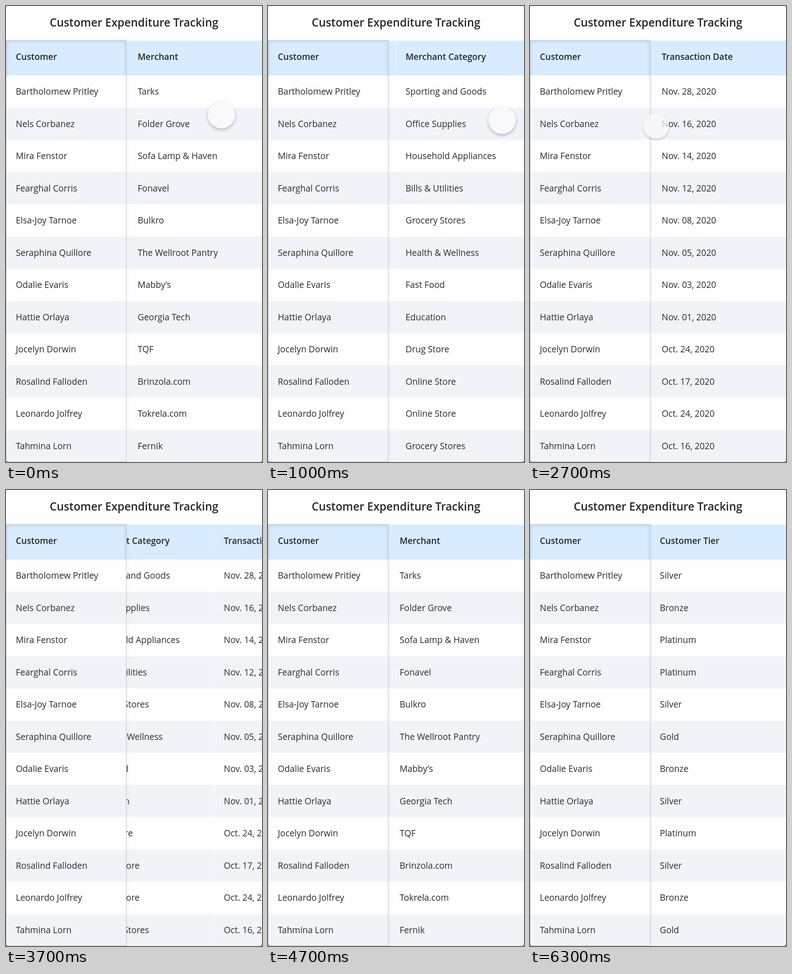
These frames come from a looping animation (561x998 px, 6.6 s). An HTML page:

```html
<!DOCTYPE html>
<html lang="en">
<head>
<meta charset="utf-8">
<title>Customer Expenditure Tracking</title>
<style>
  html, body { margin: 0; width: 100%; height: 100%; overflow: hidden; background: #8c8c90; }
  #stage {
    position: absolute; left: 0; top: 0; width: 561px; height: 998px; overflow: hidden;
    border-radius: 0 0 6px 6px; background: #fefdff; color: #2a2c2f;
    font: 400 19.1px "Open Sans", sans-serif; white-space: nowrap;
  }
  h1 {
    position: absolute; left: 0; top: 16px; width: 561px; margin: 0;
    font-size: 24.4px; font-weight: 600; line-height: 40px; text-align: center; color: #242629;
  }
  .band { position: absolute; left: 0; width: 561px; height: 70.5px; background: #f2f3f8; }
  .band.head { height: 76px; background: #d9ecff; }
  #view { position: absolute; left: 264px; top: 76px; width: 297px; height: 922px; overflow: hidden; }
  #track { position: absolute; left: 0; top: 0; will-change: transform; }
  .col { position: absolute; top: 0; width: 295px; height: 922px; }
  #track .col + .col::before {
    content: ""; position: absolute; left: 0; top: 0; width: 1px; height: 922px;
    background: rgba(255, 255, 255, .4);
  }
  .cell { position: absolute; left: 21.5px; height: 70.5px; line-height: 70.5px; }
  .cell.head { line-height: 70px; font-weight: 600; color: #24272b; }
  #frozen {
    position: absolute; left: 0; top: 75px; width: 264px; height: 923px; box-sizing: border-box;
    border: 1px solid #bcbcc0; border-radius: 0 0 0 6px; box-shadow: 0 0 10px rgba(60, 80, 110, .05);
  }
  #shade { position: absolute; left: 1px; top: 76px; width: 262px; height: 76px; overflow: hidden; }
  #shade::before {
    content: ""; position: absolute; left: 0; top: 0; width: 262px; height: 110px;
    box-shadow: inset 0 1px 9px rgba(90, 125, 165, .24);
  }
  #names { left: 0; top: 76px; }
  #touch {
    position: absolute; left: -30px; top: -30px; width: 60px; height: 60px; border-radius: 50%;
    background: #f9f9fb; box-shadow: 0 3px 6px rgba(0, 0, 0, .26);
  }
</style>
</head>
<body>
<div id="stage">
  <h1>Customer Expenditure Tracking</h1>
  <div id="view"><div id="track"></div></div>
  <div id="shade"></div>
  <div id="frozen"></div>
  <div id="touch"></div>
</div>
<script>
const LOOP = 6600, STEP = 100, ROW = 70.5, HEAD = 76, COL = 295;
const $ = id => document.getElementById(id);

const customers = ['Customer', 'Bartholomew Pritley', 'Nels Corbanez', 'Mira Fenstor',
  'Fearghal Corris', 'Elsa-Joy Tarnoe', 'Seraphina Quillore', 'Odalie Evaris',
  'Hattie Orlaya', 'Jocelyn Dorwin', 'Rosalind Falloden', 'Leonardo Jolfrey', 'Tahmina Lorn'];

const columns = [
  ['Customer Tier', 'Silver', 'Bronze', 'Platinum', 'Platinum', 'Silver', 'Gold',
    'Bronze', 'Silver', 'Platinum', 'Silver', 'Bronze', 'Gold'],
  ['Merchant', 'Tarks', 'Folder Grove', 'Sofa Lamp & Haven', 'Fonavel', 'Bulkro',
    'The Wellroot Pantry', 'Mabby’s', 'Georgia Tech', 'TQF', 'Brinzola.com',
    'Tokrela.com', 'Fernik'],
  ['Merchant Category', 'Sporting and Goods', 'Office Supplies', 'Household Appliances',
    'Bills & Utilities', 'Grocery Stores', 'Health & Wellness', 'Fast Food', 'Education',
    'Drug Store', 'Online Store', 'Online Store', 'Grocery Stores'],
  ['Transaction Date', ...['Nov. 28', 'Nov. 16', 'Nov. 14', 'Nov. 12', 'Nov. 08', 'Nov. 05',
    'Nov. 03', 'Nov. 01', 'Oct. 24', 'Oct. 17', 'Oct. 24', 'Oct. 16'].map(d => d + ', 2020')]
];

// Resting scroll positions of the columns
const TIER = 0, MERCHANT = COL - 4, CATEGORY = MERCHANT + COL, DATE = CATEGORY + COL;

// Moves: start, end, goal. A swipe may stop short and then settle.
const swipes = [
  [0, 700, CATEGORY - 13],
  [1200, 1600, DATE - 20],
  [1600, 1900, DATE],
  [3400, 4150, CATEGORY],
  [4150, 4700, MERCHANT],
  [4700, 5600, TIER]
];

// Moves: start, end, x, y
const strokes = [
  [0, 800, 122, 255],
  [800, 1000, 513, 250],
  [1200, 1600, 210, 253],
  [1600, 1900, 441, 267],
  [1900, 2400, 394, 264],
  [2500, 2950, 224, 262],
  [3000, 3300, 299, 262],
  [3400, 3700, 620, 262]
];

const easeOut = p => 1 - (1 - p) ** 2;

function follow(moves, from, t) {
  return moves.reduce((pos, [start, end, ...goal]) => {
    const p = easeOut(Math.min(1, Math.max(0, (t - start) / (end - start))));
    return pos.map((v, i) => v + (goal[i] - v) * p);
  }, from);
}

function box(parent, cls, top, text = '') {
  const el = document.createElement('div');
  el.className = cls;
  el.style.top = top + 'px';
  el.textContent = text;
  parent.appendChild(el);
  return el;
}

function column(parent, texts, left) {
  const col = document.createElement('div');
  col.className = 'col';
  col.style.left = left + 'px';
  texts.forEach((s, i) => i
    ? box(col, 'cell', HEAD + (i - 1) * ROW, s)
    : box(col, 'cell head', 0, s));
  parent.appendChild(col);
  return col;
}

const stage = $('stage'), bands = document.createElement('div');
stage.prepend(bands);
box(bands, 'band head', HEAD);
for (let i = 1; i < 12; i += 2) box(bands, 'band', HEAD * 2 + i * ROW);

columns.forEach((c, i) => column($('track'), c, i * COL - 1));
column(stage, customers, 0).id = 'names';
stage.appendChild($('touch'));

function draw(now) {
  const t = Math.floor((now % LOOP) / STEP) * STEP;
  const [scroll] = follow(swipes, [MERCHANT], t);
  const [x, y] = follow(strokes, [472, 238], t);
  const light = t > 2500;
  $('track').style.transform = `translateX(${-scroll}px)`;
  Object.assign($('touch').style, {
    transform: `translate(${x}px, ${y}px) scale(${light ? 28 / 30 : 1})`,
    opacity: light ? .75 : 1
  });
}

const begin = performance.now();
function tick() {
  draw(performance.now() - begin);
  requestAnimationFrame(tick);
}
tick();
</script>
</body>
</html>
```
